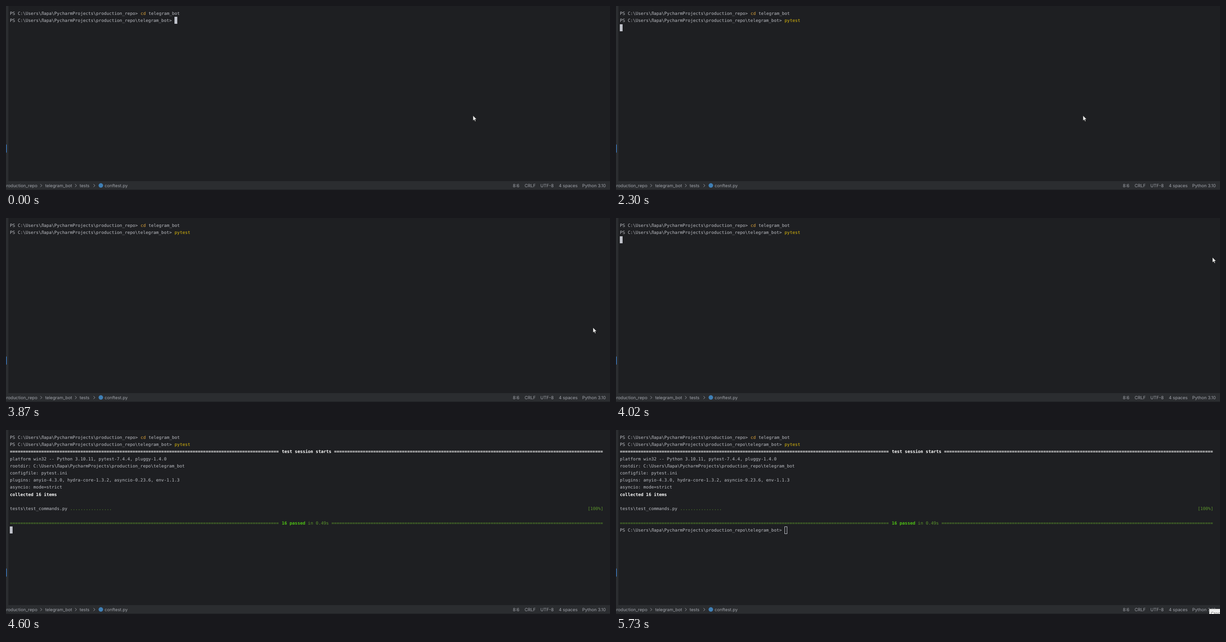
Animation, 1280 px wide and 393 px high, one loop 5.88 s. Source, as an HTML page:

```html
<!DOCTYPE html>
<html lang="en">
<head>
<meta charset="utf-8">
<title>Terminal test run</title>
<style>
html, body { margin: 0; width: 100%; height: 100%; overflow: hidden; background: #1e1f22; }
svg { display: block; }
text { white-space: pre; text-rendering: geometricPrecision; fill: #bcbec4; }
#term text { font: 9.2px "DejaVu Sans Mono", monospace; }
#term .orange { fill: #dda33a; }
#term .yellow { fill: #dbb90c; }
#term .green { fill: #5c962c; }
#term .bold { font-weight: bold; fill: #fff; }
#term .pass { font-weight: bold; fill: #4fc414; }
#bar text { font: 9.23px Inter, sans-serif; fill: #a0a3aa; }
#tip text { font: 9px "Open Sans", sans-serif; fill: #575757; }
</style>
</head>
<body>
<svg width="1280" height="393" viewBox="0 0 1280 393">
  <rect width="1280" height="393" fill="#1e1f22"/>
  <path d="M0 0H5V374H1280V392H0Z" fill="#2b2d30"/>
  <rect x="-3" y="295.5" width="4.3" height="18" rx="1.5" fill="#3d85d6"/>
  <g id="term"></g>
  <rect id="caret" height="15"/>
  <g id="bar">
    <path d="M73 380.5l3 3-3 3M146.500 380.5l3 3-3 3M185.500 380.5l3 3-3 3" fill="none" stroke="#a0a3aa"/>
    <circle cx="201" cy="383.3" r="4.8" fill="#3f7fb5"/>
  </g>
  <g id="tip">
    <rect x="1256" y="381" width="26" height="14" fill="#000" opacity=".3"/>
    <rect x="1257.5" y="382.5" width="26" height="14" fill="#ececec" stroke="#cfcfcf"/>
    <text x="1260.5" y="394.5">Стоп</text>
  </g>
  <path id="mouse" d="M0 0V11L2.500 8.700L4.300 12.600L6 11.900L4.300 8.100H7.700Z" fill="#f4f4f4" stroke="#111" stroke-width=".6"/>
</svg>
<script>
const LOOP = 5880, X0 = 8.3, Y0 = 8.2, CW = 5.54, LH = 15.22;
const $ = id => document.getElementById(id);

function addText(parent, x, y, str, cls = '') {
  const el = document.createElementNS('http://www.w3.org/2000/svg', 'text');
  el.setAttribute('x', x);
  el.setAttribute('y', y);
  el.setAttribute('class', cls);
  el.textContent = str;
  parent.append(el);
  return el;
}

// Terminal pieces with the time span in which each is visible
const pieces = [];
function put(row, col, str, cls, from = 0, to = LOOP) {
  const el = addText($('term'), X0 + col * CW, Y0 + 10.7 + row * LH, str, cls);
  pieces.push({ el, from, to });
  return el;
}

const home = 'C:\\Users\\Лара\\PycharmProjects\\production_repo';
const bot = home + '\\telegram_bot';
const prompt = `PS ${bot}>`;
const START = 4160, DONE = 4600;

put(0, 0, `PS ${home}>`);
put(0, 50, 'cd', 'orange');
put(0, 53, 'telegram_bot');
put(1, 0, prompt);
const command = put(1, 63, '', 'yellow');

const rule = '='.repeat(103);
put(2, 0, rule, 'bold', START);
put(2, 104, 'test session starts', 'bold', START);
put(2, 124, rule, 'bold', START);
[
  'platform win32 -- Python 3.10.11, pytest-7.4.4, pluggy-1.4.0',
  'rootdir: ' + bot,
  'configfile: pytest.ini',
  'plugins: anyio-4.3.0, hydra-core-1.3.2, asyncio-0.23.6, env-1.1.3',
  'asyncio: mode=strict'
].forEach((line, i) => put(3 + i, 0, line, '', START));
put(8, 0, 'collecting ...', 'bold', START, DONE);
put(8, 0, 'collected 16 items', 'bold', DONE);
put(10, 0, 'tests\\test_commands.py', '', DONE);
put(10, 23, '.'.repeat(16), 'green', DONE);
put(10, 221, '[100%]', 'green', DONE);
put(12, 0, rule, 'green', DONE);
put(12, 104, '16 passed', 'pass', DONE);
put(12, 114, 'in 0.49s', 'green', DONE);
put(12, 123, rule + '=', 'green', DONE);
put(13, 0, prompt, '', 4880);

// Status bar
const label = (x, str) => addText($('bar'), x, 386.8, str);
label(66.5, 'production_repo').setAttribute('text-anchor', 'end');
label(83, 'telegram_bot');
label(156, 'tests');
label(209, 'conftest.py');
label(1074, '8:6');
label(1099, 'CRLF');
label(1132.5, 'UTF-8');
label(1171.5, '4 spaces');
label(1221, 'Python 3.10');

// Step tracks: [time, ...values]
const typed = [[0, 0], [150, 1], [430, 2], [1000, 3], [1440, 5], [1570, 6]];
const caretAt = [[0, 1, 63], [2300, 2, 0], [START, 8, 15], [DONE, 13, 0], [4880, 13, 63]];
const caretOn = [[0, 1], [2720, 0], [3290, 1], [3720, 0], [4020, 1]];
const mouseAt = [[0, 989.7, 234], [3440, 1012, 43.5], [3590, 1025, 31], [3720, 1034, 23.5],
  [3870, 1244, 234], [4020, 1264, 84], [START, -50, -50]];
const tipAlpha = [[0, 0], [5310, 0.4], [5460, 0.8], [5730, 1]];
const at = (track, t) => track.findLast(step => step[0] <= t).slice(1);

function draw(t) {
  for (const p of pieces)
    p.el.style.visibility = t >= p.from && t < p.to ? 'visible' : 'hidden';

  const [count] = at(typed, t);
  command.textContent = 'pytest'.slice(0, count);

  const [row, col] = at(caretAt, t);
  const caret = $('caret'), hollow = t >= 5730;
  const shift = t < 2300 ? count : 0, inset = hollow ? 0.5 : 0;
  caret.setAttribute('x', Math.round(X0 + (col + shift) * CW) + inset);
  caret.setAttribute('y', Math.round(Y0 + row * LH) + inset);
  caret.setAttribute('width', hollow ? 5 : 6);
  caret.setAttribute('fill', hollow ? 'none' : '#bfc1c9');
  caret.setAttribute('stroke', hollow ? '#bfc1c9' : 'none');
  caret.style.visibility = at(caretOn, t)[0] ? 'visible' : 'hidden';

  $('mouse').setAttribute('transform', `translate(${at(mouseAt, t)})`);
  $('tip').setAttribute('opacity', at(tipAlpha, t)[0]);
}

const began = performance.now();
function tick() {
  draw((performance.now() - began) % LOOP);
  requestAnimationFrame(tick);
}
tick();
</script>
</body>
</html>
```
